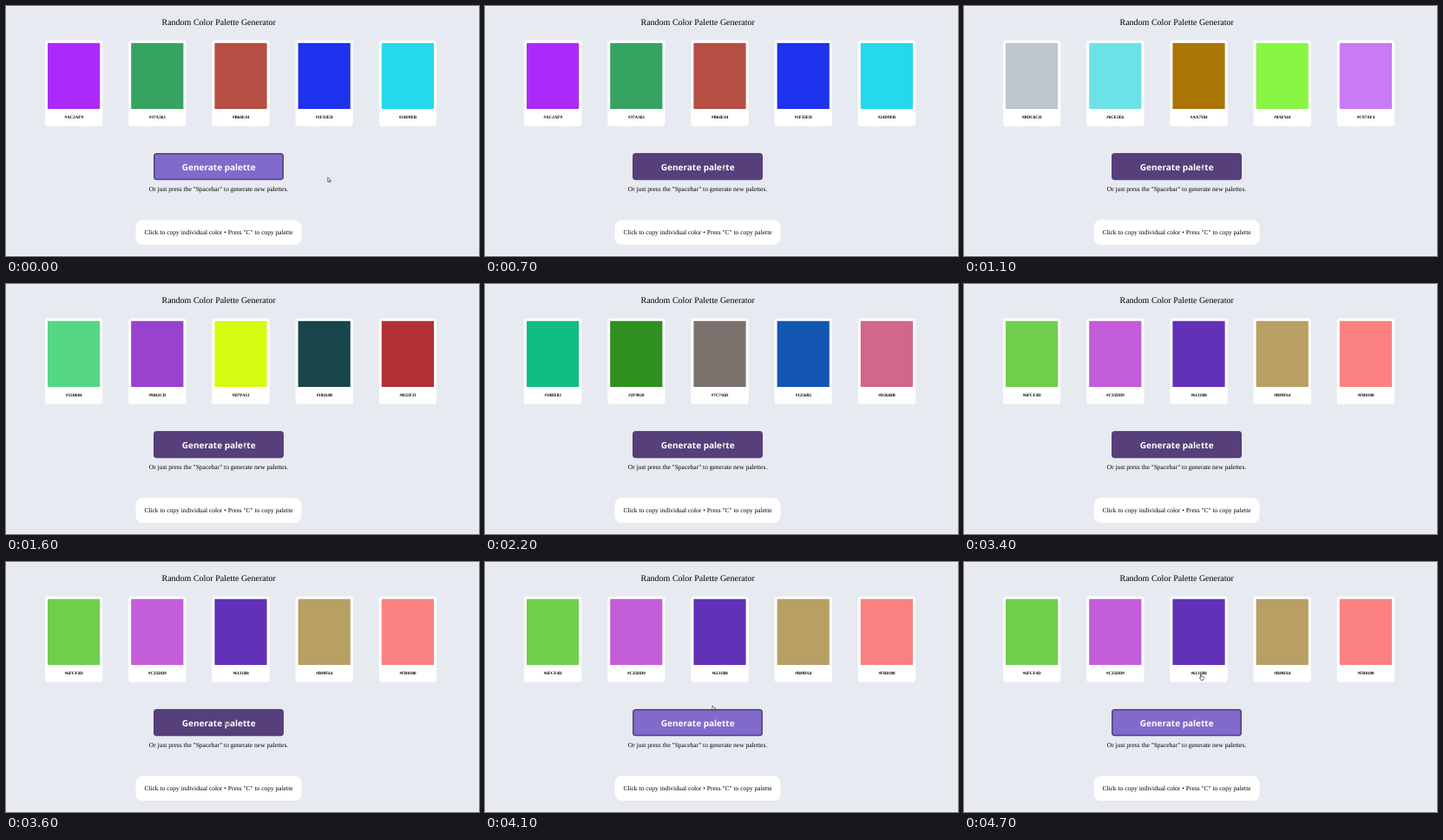
Recreate the animation shown at these times as an HTML page. Size 545 px wide and 289 px high, loop 5 s.

```html
<!DOCTYPE html>
<html lang="en">
<head>
<meta charset="utf-8">
<title>Random Color Palette Generator</title>
<style>
  html, body { margin: 0; width: 100%; height: 100%; overflow: hidden; background: #e7eaf0; }
  svg { display: block; width: 545px; height: 289px; }
  text { font-family: "Liberation Serif", "Times New Roman", serif; text-anchor: middle; text-rendering: geometricPrecision; }
  .hex { font-size: 5px; font-weight: 700; }
  .note { font-size: 7.5px; }
  .label { font: 700 10px "Noto Sans", "Open Sans", sans-serif; fill: #fff; }
  .cursor path { fill: #fff; stroke: #333; stroke-width: .7; stroke-linejoin: round; }
</style>
</head>
<body>
<svg viewBox="0 0 545 289">
  <rect width="545" height="289" fill="#e7eaf0"/>
  <path d="M0 .5H545M0 288.5H545" stroke="#f3f5f8"/>
  <text x="245.2" y="21.5" font-size="10">Random Color Palette Generator</text>
  <g id="cards"></g>
  <rect id="button" x="170.75" y="170.75" width="148.5" height="29.7" rx="3" stroke="#553f7c" stroke-width="1.5"/>
  <text class="label" x="245.2" y="189.5">Generate palette</text>
  <text class="note" x="245" y="214.3">Or just press the "Spacebar" to generate new palettes.</text>
  <rect x="149.5" y="247.3" width="191" height="28.7" rx="8" fill="#fff"/>
  <text class="note" x="245" y="264.2">Click to copy individual color • Press "C" to copy palette</text>
  <g id="cursor" class="cursor">
    <path id="arrow" d="M0 0V5.2L1.2 4.1L2 6L2.9 5.6L2.1 3.8H3.7Z"/>
    <path id="hand" d="M1.3 .6Q1.8 0 2.3 .6V2.6Q3 2.2 3.3 2.8Q4 2.5 4.3 3.1Q5 2.9 5.1 3.6V5L4.4 7H1.8L.1 4.6Q0 3.9 .7 4L1.3 4.6Z"/>
  </g>
</svg>
<script>
const LOOP = 5000, STEP = 100;

// [start time, colours]
const palettes = [
  [0, "AC2AF9 37A363 B64E44 1F32ED 24D9EB"],
  [900, "BDC6CD 6CE2E6 AA7504 8AF544 C97AF4"],
  [1600, "55D684 9842CD D7FA13 18454B B22F33"],
  [2100, "10BE83 2F9020 7C716D 1256B2 D2668B"],
  [2700, "9624C3 BC9424 76220C 8EB19F 4276B9"],
  [3300, "6FCF4D C35DD9 6131B8 B89F64 FB8180"]
].map(([at, list]) => [at, list.split(" ").map(c => "#" + c)]);

// [time, x, y] of the pointer tip
const path = [
  [0, 370.8, 198], [600, 276, 184.5], [700, 273.5, 184], [2200, 273.5, 184],
  [2600, 291, 185], [2900, 296.3, 185], [3200, 286, 184], [3600, 253.6, 183],
  [3900, 253.6, 183], [4400, 277.5, 135], [4700, 271.3, 129.6], [LOOP, 271.3, 129.6]
];

const $ = id => document.getElementById(id);
const make = (tag, attrs) => {
  const el = document.createElementNS("http://www.w3.org/2000/svg", tag);
  for (const key in attrs) el.setAttribute(key, attrs[key]);
  return $("cards").appendChild(el);
};

const cards = Array.from({ length: 5 }, (_, i) => {
  const x = 45 + i * 96.2;
  make("rect", { x, y: 39.8, width: 66.3, height: 99.2, rx: 3.5, fill: "#fff" });
  return {
    swatch: make("rect", { x: x + 3, y: 42.8, width: 60.2, height: 76.2 }),
    label: make("text", { x: x + 33.2, y: 130, class: "hex" })
  };
});

function pointerAt(t) {
  const i = path.findIndex(p => p[0] > t);
  const [t0, x0, y0] = path[i - 1], [t1, x1, y1] = path[i];
  const k = (t - t0) / (t1 - t0), e = k * k * (3 - 2 * k);
  return [x0 + (x1 - x0) * e, y0 + (y1 - y0) * e];
}

let shown;
function draw(t) {
  const colors = palettes.filter(p => p[0] <= t).pop()[1];
  if (colors !== shown) {
    shown = colors;
    cards.forEach(({ swatch, label }, i) => {
      swatch.setAttribute("fill", colors[i]);
      label.textContent = colors[i];
    });
  }
  const [x, y] = pointerAt(t);
  const hover = x > 170 && x < 320 && y > 170 && y < 201;
  const onCard = y < 139;
  $("button").setAttribute("fill", hover ? "#563f7b" : "#806acb");
  $("cursor").setAttribute("transform", `translate(${x} ${y})`);
  $("arrow").style.display = onCard ? "none" : "";
  $("hand").style.display = onCard ? "" : "none";
}

const start = performance.now();
function tick() {
  const t = (performance.now() - start) % LOOP;
  draw(Math.floor(t / STEP) * STEP);
  requestAnimationFrame(tick);
}
tick();
</script>
</body>
</html>
```
